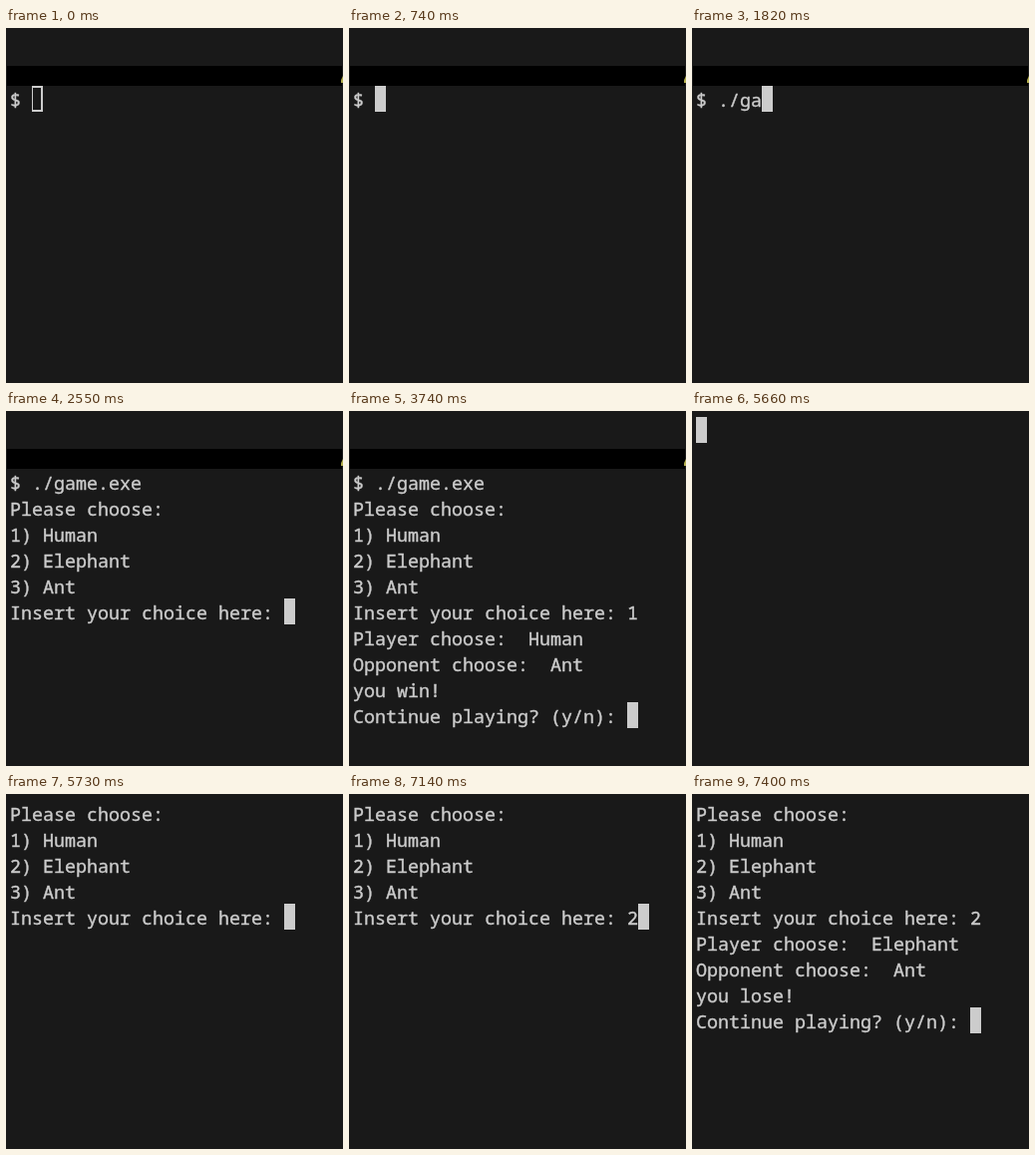
An HTML page that plays this animation: 338x356 px, repeating every 8000 ms.

```html
<!DOCTYPE html>
<html lang="en">
<head>
<meta charset="utf-8">
<title>Terminal game</title>
<style>
  html, body { margin: 0; width: 100%; height: 100%; overflow: hidden; background: #191919; }
  #stage { position: relative; width: 338px; height: 356px; overflow: hidden; }
  #bar { position: absolute; left: 1px; top: 38px; width: 336px; height: 20px; background: #000; }
  #edge { position: absolute; left: 336px; top: 48px; width: 2px; height: 7px; background: #b5b04e;
          clip-path: polygon(100% 0, 100% 100%, 0 100%, 0 60%); }
  #screen { position: absolute; left: 4px; margin: 1px 0 0; white-space: pre; color: #ccc;
            font: 18.333px/26px "Noto Sans Mono", monospace; font-variant-ligatures: none;
            -webkit-text-stroke: 0.4px #ccc; }
  #cursor { position: absolute; box-sizing: border-box; width: 11px; height: 26px;
            border: solid #ccc; border-width: 2px 2px 2px 1px; background: #ccc; }
  #cursor.hollow { background: none; }
</style>
</head>
<body>
<div id="stage">
  <div id="header"><div id="bar"></div><div id="edge"></div></div>
  <pre id="screen"></pre>
  <div id="cursor"></div>
</div>
<script>
  const LOOP = 8000, CELL = 11, ROW = 26, LEFT = 4;
  const CLEAR_AT = 5660;
  const $ = id => document.getElementById(id);

  const menu = 'Please choose:\n1) Human\n2) Elephant\n3) Ant\nInsert your choice here: ';
  const result = (player, outcome) =>
    `\nPlayer choose:  ${player}\nOpponent choose:  Ant\nyou ${outcome}!\nContinue playing? (y/n): `;
  const run = '$ ./game.exe\n';
  const firstRound = run + menu + '1' + result('Human', 'win');

  // [start time, screen text, cursor style]; the cursor sits after the text
  const steps = [
    [0, '$ ', 'hollow'],
    [660, '$ '],
    [1670, '$ ./'],
    [1740, '$ ./g'],
    [1820, '$ ./ga'],
    [2020, '$ ./game.exe '],
    [2350, run],
    [2470, run, 'hidden'],
    [2550, run + menu],
    [3410, run + menu + '1'],
    [3740, firstRound],
    [5330, firstRound + 'y'],
    [CLEAR_AT, ''],
    [5730, menu],
    [7140, menu + '2'],
    [7400, menu + '2' + result('Elephant', 'lose')]
  ];

  let shown = null;

  function show(step) {
    const [start, text, style = ''] = step;
    const cleared = start >= CLEAR_AT;
    const top = cleared ? 6 : 58;
    const lines = text.split('\n');
    const row = lines.length - 1;
    $('header').hidden = cleared;
    $('screen').textContent = text;
    $('screen').style.top = top + 'px';
    $('cursor').className = style;
    $('cursor').hidden = style === 'hidden';
    $('cursor').style.left = LEFT + lines[row].length * CELL + 'px';
    $('cursor').style.top = top + row * ROW + 'px';
  }

  function tick() {
    const t = performance.now() % LOOP;
    const step = steps.findLast(s => s[0] <= t);
    if (step !== shown) show(shown = step);
    requestAnimationFrame(tick);
  }
  tick();
</script>
</body>
</html>
```
